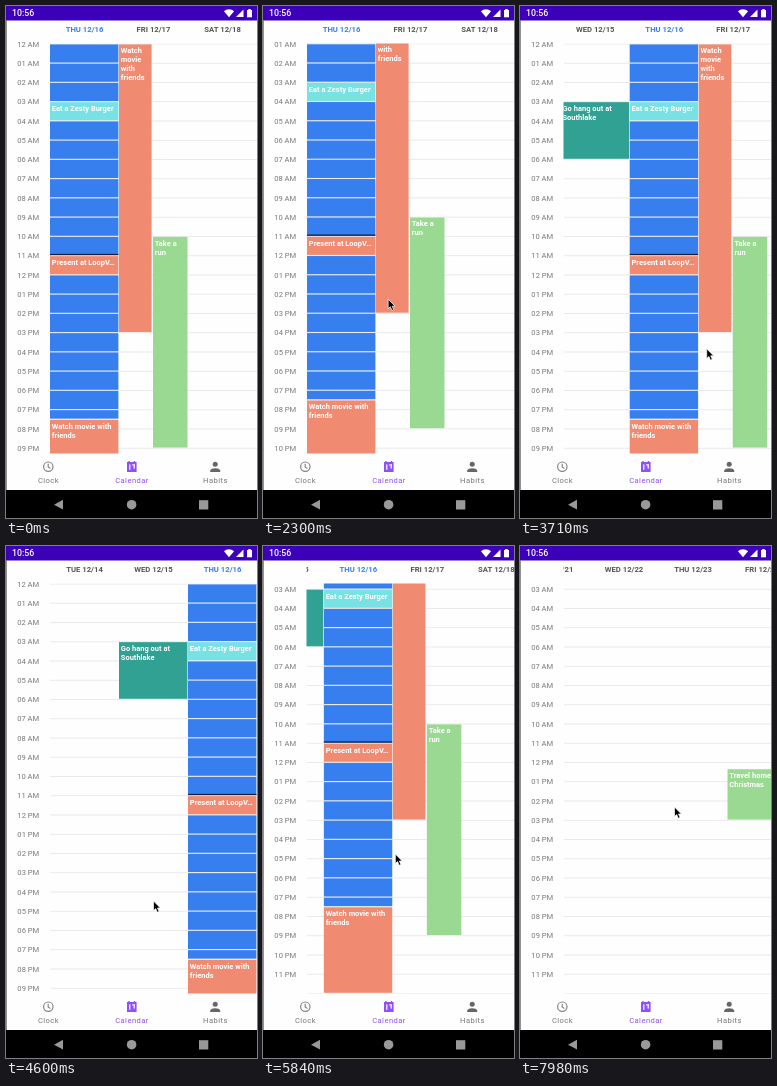
Animation of 251 by 512 pixels, one loop 8 s. Source, as an HTML page with a canvas:

```html
<!DOCTYPE html>
<html lang="en">
<head>
<meta charset="utf-8">
<title>Weekly calendar</title>
<style>
  html, body { margin: 0; width: 100%; height: 100%; overflow: hidden; background: #fff; }
  canvas { display: block; width: 251px; height: 512px; }
</style>
</head>
<body>
<canvas id="stage"></canvas>
<script>
const W = 251, H = 512, LOOP = 8000, TICK = 88.6;
const LEFT = 44, TOP = 38, BOTTOM = 447.5, DAY_W = 69, HOUR_H = 19.25;
const MAX_Y = 24 * HOUR_H - (BOTTOM - TOP);
const FONT = 'Roboto, "Noto Sans", sans-serif';
const BLUE = '#377fee', ORANGE = '#f08b71', CYAN = '#78e1e3', GREEN = '#9ad992', TEAL = '#30a192';
const GREY = '#777', PURPLE = '#8f50f8';
const DAYS = ['SUN', 'MON', 'TUE', 'WED', 'THU', 'FRI', 'SAT'];

// Strokes of the pointer, in ticks; the content follows along the given axis.
const stroke = (axis, start, end, from, to) => ({ axis, start, end, from, to });
const strokes = [
  stroke('', 4, 8, [208, 367], [137, 340]),
  stroke('y', 10, 18, [137, 340], [130, 215]),
  stroke('y', 24.8, 29, [128, 260], [118, 376]),
  stroke('x', 36, 42.3, [121, 360], [190, 342]),
  stroke('x', 44, 48, [120, 348], [189, 352]),
  stroke('y', 52, 56, [147.5, 355], [158, 300]),
  stroke('x', 63.7, 68, [253.5, 308], [27, 308]),
  stroke('x', 71.3, 77, [69.5, 309], [20, 292]),
  stroke('x', 79, 82, [190, 286], [31, 285]),
  stroke('x', 84, 90, [246, 272], [154.5, 261])
];

// day offset from today, start hour, end hour, colour, text lines, x and width inside the column
const event = (day, from, to, color, lines = [], x = 0, w = DAY_W - 0.6) => ({ day, from, to, color, lines, x, w });
const events = [
  event(-1, 3, 6, TEAL, ['Go hang out at', 'Southlake']),
  event(0, 3, 4, CYAN, ['Eat a Zesty Burger']),
  event(0, 11, 12, ORANGE, ['Present at LoopV…']),
  event(0, 19.5, 24, ORANGE, ['Watch movie with', 'friends']),
  event(1, 0, 15, ORANGE, ['Watch', 'movie', 'with', 'friends'], 0, 32.6),
  event(1, 10, 21, GREEN, ['Take a', 'run'], 34, DAY_W / 2),
  event(8, 12.33, 15, GREEN, ['Travel home for', 'Christmas'])
];
for (let h = 0; h < 19.5; h++) {
  if (h !== 3 && h !== 11) events.push(event(0, h, Math.min(h + 1, 19.5), BLUE));
}

const canvas = document.getElementById('stage');
const c = canvas.getContext('2d');
const ratio = window.devicePixelRatio || 1;
canvas.width = W * ratio;
canvas.height = H * ratio;

const clamp = (v, lo, hi) => Math.min(hi, Math.max(lo, v));
const mix = (a, b, p) => a.map((v, i) => v + (b[i] - v) * p);

function poseAt(tick) {
  let sx = 0, sy = 0, pointer = null, previous = null;
  for (const s of strokes) {
    if (tick < s.start) {
      // Rest first, then hurry to where the next stroke begins.
      if (previous) {
        const p = (tick - previous.end) / (s.start - previous.end);
        pointer = mix(previous.to, s.from, p ** 3);
      }
      break;
    }
    pointer = mix(s.from, s.to, clamp((tick - s.start) / (s.end - s.start), 0, 1));
    if (s.axis === 'x') sx -= pointer[0] - s.from[0];
    if (s.axis === 'y') sy = clamp(sy - pointer[1] + s.from[1], 0, MAX_Y);
    if (tick <= s.end) break;
    previous = s;
  }
  return { sx, sy, pointer };
}

function rect(x, y, w, h, color) {
  c.fillStyle = color;
  c.fillRect(x, y, w, h);
}

function text(s, x, y, size, weight, color, align = 'left', spacing = 0) {
  c.font = `${weight} ${size}px ${FONT}`;
  c.letterSpacing = spacing + 'px';
  c.textAlign = align;
  c.fillStyle = color;
  c.fillText(s, x, y + size * 0.36);
}

function shape(points, color) {
  c.beginPath();
  points.forEach(([x, y]) => c.lineTo(x, y));
  c.closePath();
  c.fillStyle = color;
  c.fill();
}

function disc(x, y, r, color) {
  c.beginPath();
  c.arc(x, y, r, 0, Math.PI * 2);
  c.fillStyle = color;
  c.fill();
}

function clipped(x, y, w, h, draw) {
  c.save();
  c.beginPath();
  c.rect(x, y, w, h);
  c.clip();
  draw();
  c.restore();
}

function drawEvent(e, sx, sy) {
  const x = LEFT + e.day * DAY_W - sx + e.x;
  const y = TOP + e.from * HOUR_H - sy;
  const h = (e.to - e.from) * HOUR_H;
  if (x > W || x + e.w < LEFT) return;
  rect(x, y + 0.4, e.w, h - 1.1, e.color);
  e.lines.forEach((s, i) => text(s, x + 1.8, y + 6.6 + i * 9, 7.5, 700, '#fff'));
}

function drawCalendar(sx, sy) {
  clipped(LEFT - 0.5, TOP - 0.4, W, BOTTOM - TOP + 0.4, () => {
    for (let h = 0; h <= 24; h++) rect(LEFT, TOP + h * HOUR_H - sy - 0.5, W, 1, '#e9e9e9');
    events.forEach(e => drawEvent(e, sx, sy));
    rect(LEFT - sx, TOP + (10 + 56 / 60) * HOUR_H - sy - 0.6, DAY_W - 0.6, 1.3, '#10203c');
  });
  clipped(0, 31, LEFT, BOTTOM - 31, () => {
    for (let h = 0; h < 24; h++) {
      const label = String(h % 12 || 12).padStart(2, '0') + (h < 12 ? ' AM' : ' PM');
      text(label, 33.2, TOP + h * HOUR_H - sy, 7.6, 400, GREY, 'right');
    }
  });
  clipped(LEFT - 0.5, 15, W, 16, () => {
    const first = Math.floor(sx / DAY_W) - 1;
    for (let d = first; d < first + 6; d++) {
      const label = `${DAYS[(d + 11) % 7]} 12/${16 + d}`;
      text(label, LEFT + (d + 0.5) * DAY_W - sx, 23.3, 7.7, 700, d ? '#555' : BLUE, 'center');
    }
  });
}

function drawStatusBar() {
  rect(0, 0, W, 14.5, '#3c00b8');
  text('10:56', 6, 7.3, 8.8, 500, '#fff');
  c.beginPath();
  c.moveTo(223, 11.3);
  c.arc(223, 11.3, 8, -Math.PI * 0.72, -Math.PI * 0.28);
  c.closePath();
  c.fillStyle = '#fff';
  c.fill();
  shape([[230, 11], [237.5, 11], [237.5, 3.4]], '#fff');
  rect(241, 4, 5, 7.3, '#fff');
  rect(242.3, 3, 2.4, 1, '#fff');
}

function drawTabs() {
  c.strokeStyle = '#858585';
  c.lineWidth = 1.2;
  c.beginPath();
  c.arc(42.3, 460.7, 4.7, 0, Math.PI * 2);
  c.moveTo(42.2, 457.8);
  c.lineTo(42.2, 461);
  c.lineTo(44.4, 462.4);
  c.stroke();

  rect(121, 456, 9.6, 10, PURPLE);
  for (const x of [122.3, 127.8]) rect(x, 455, 1.4, 2, PURPLE);
  rect(123.2, 458.4, 1.2, 5.4, '#fff');
  rect(126, 458.4, 2.8, 1, '#fff');
  rect(127.6, 458.4, 1.2, 4.2, '#fff');

  disc(209.2, 458.3, 2.5, '#666');
  c.beginPath();
  c.moveTo(204.2, 466);
  c.lineTo(204.2, 464.6);
  c.bezierCurveTo(204.4, 461.3, 214, 461.3, 214.2, 464.6);
  c.lineTo(214.2, 466);
  c.fill();

  ['Clock', 'Calendar', 'Habits'].forEach((s, i) =>
    text(s, 42.5 + i * 83.5, 474.7, 7.6, 400, i === 1 ? PURPLE : GREY, 'center', 0.45));
}

function drawSystemBar() {
  rect(0, 484, W, 28, '#000');
  shape([[48, 498.7], [57, 493.8], [57, 503.6]], '#999');
  disc(125.6, 498.7, 4.8, '#999');
  rect(193, 494.2, 9.3, 9.3, '#999');
}

function drawPointer([x, y]) {
  const outline = [[0, 0], [0, 9.6], [2.2, 7.6], [3.8, 11.3], [5.6, 10.5], [4, 7], [6.9, 7]];
  shape(outline.map(([dx, dy]) => [x + dx, y + dy]), '#000');
  c.strokeStyle = '#fff';
  c.lineWidth = 0.7;
  c.stroke();
}

function draw(now) {
  const tick = Math.floor((now % LOOP + 20) / TICK);
  const { sx, sy, pointer } = poseAt(tick);
  c.setTransform(ratio, 0, 0, ratio, 0, 0);
  rect(0, 0, W, H, '#fefefe');
  drawCalendar(sx, sy);
  drawTabs();
  rect(0, 14.5, 0.8, 470, GREY);
  drawStatusBar();
  drawSystemBar();
  if (pointer) drawPointer(pointer);
}

const start = performance.now();
function loop() {
  draw(performance.now() - start);
  requestAnimationFrame(loop);
}
loop();
</script>
</body>
</html>
```
